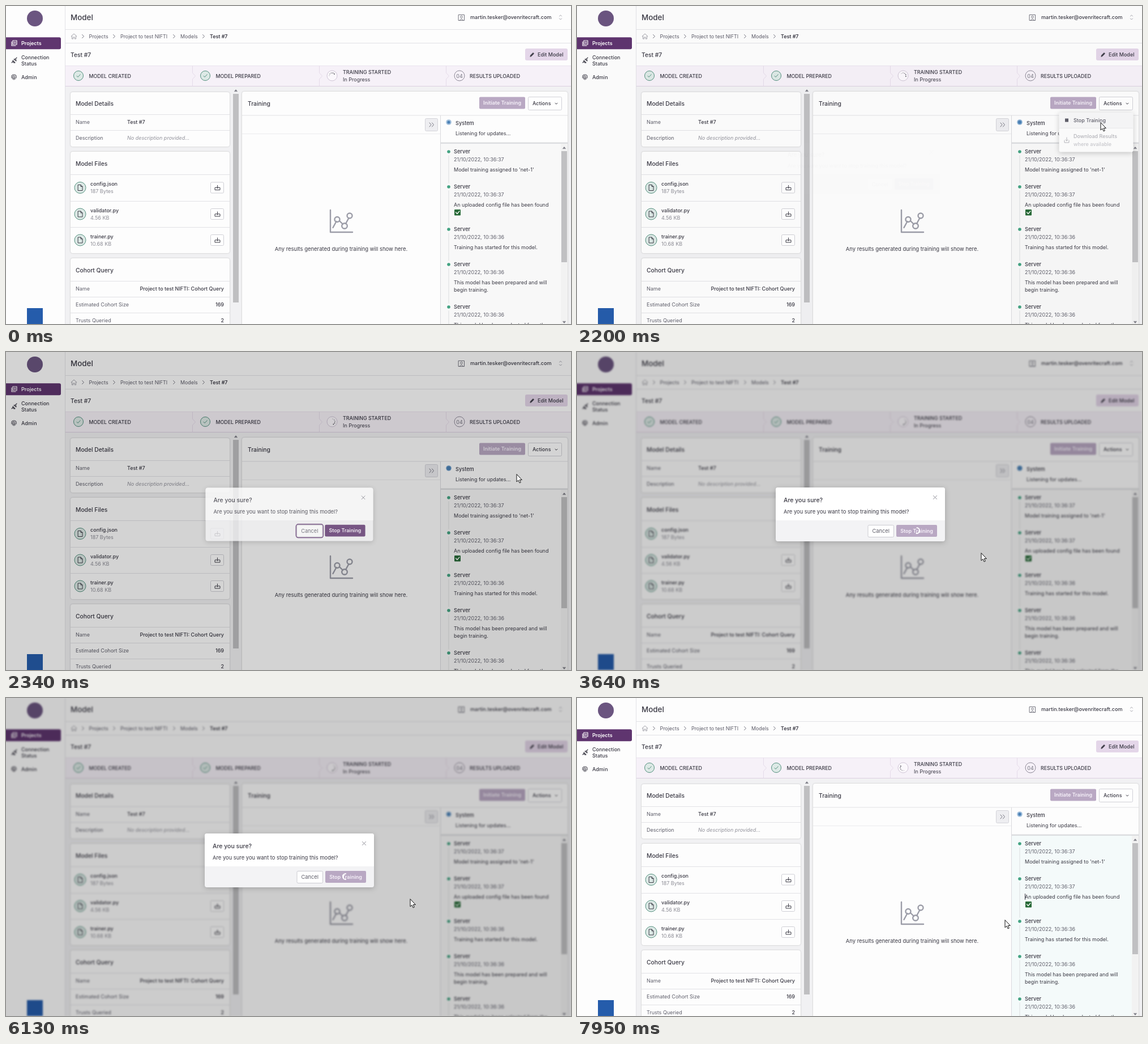
Recreate the animation shown at these times as an HTML page. Size 998x561 px, loop 8 s.

```html
<!DOCTYPE html>
<html lang="en">
<head>
<meta charset="utf-8">
<title>Model training</title>
<style>
  html, body { margin: 0; width: 100%; height: 100%; overflow: hidden; background: #fff; }
  svg { display: block; font-family: Inter, "Open Sans", sans-serif; }
  .card { filter: drop-shadow(0 .6px 1px rgba(0,0,0,.22)); }
  .float { filter: drop-shadow(0 2px 5px rgba(0,0,0,.2)); }
</style>
</head>
<body>
<svg id="stage" width="998" height="561" viewBox="0 0 998 561"></svg>
<script>
const INK = '#3b3a45', GREY = '#72727d', PALE = '#a2a2aa', RULE = '#e2e2e6',
      PURPLE = '#5f356f', FADED = '#b9a8c3', GREEN = '#55917f';

// Drawing helpers; text is placed by its vertical centre.
const text = (x, y, s, { size = 9, w = 400, c = INK, anchor = 'start', style = 'normal' } = {}) =>
  `<text x="${x}" y="${y + size * .36}" font-size="${size}" font-weight="${w}" fill="${c}" text-anchor="${anchor}" font-style="${style}">${s}</text>`;
const rect = (x, y, w, h, fill, r = 0, extra = '') =>
  `<rect x="${x}" y="${y}" width="${w}" height="${h}" rx="${r}" fill="${fill}" ${extra}/>`;
const path = (d, c = INK, w = 1, fill = 'none') =>
  `<path d="${d}" stroke="${c}" stroke-width="${w}" fill="${fill}" stroke-linecap="round" stroke-linejoin="round"/>`;
const circle = (x, y, r, fill, c = 'none', w = 1) =>
  `<circle cx="${x}" cy="${y}" r="${r}" fill="${fill}" stroke="${c}" stroke-width="${w}"/>`;
const hline = (x1, x2, y, c = RULE) => rect(x1, y, x2 - x1, 1, c);
const card = (x, y, w, h) => rect(x, y, w, h, '#fdfdfd', 4, 'class="card"');
const outline = c => `stroke="${c}" stroke-width="1"`;
const title = { size: 10.3, w: 500 }, strong = { w: 500 };

function sidebar() {
  return rect(0, 0, 104, 561, '#fdfdfd') + rect(104, 0, 1, 561, RULE)
    + circle(51, 22, 14, '#6b5580')
    + rect(-4, 55.3, 101, 21, PURPLE, 3)
    + path('M12 61H19V68H12ZM10 63V70H17M14 63.5H17M14 65.5H17', '#fff', 1.2)
    + text(27, 65.5, 'Projects', { w: 600, c: '#fff' })
    + path('M10 100L12 98M17 93L19 91M12 96L16 100Q12 101 12 96M14 94L18 97Q18 92 14 94', INK, 1.1)
    + text(27, 90.5, 'Connection', strong) + text(27, 101.5, 'Status', strong)
    + path('M10 127Q9 121 14 121T18 127M12 129V126Q12 123 14 123T16 129M14 126V130', INK, 1.1)
    + text(27, 125.5, 'Admin', strong)
    + rect(37, 533, 28, 28, '#255cab');
}

function header() {
  const crumb = { size: 8.9, c: '#5c5b68' };
  return rect(105, 0, 893, 105, '#fdfdfd')
    + text(114, 20.5, 'Model', { size: 13.4, w: 500 })
    + path('M799.5 15.5H809.5V25.5H799.5ZM801.5 25Q804.5 20.5 807.5 25', GREY)
    + circle(804.5, 19.3, 1.8, 'none', GREY)
    + text(820, 20, 'martin.tesker@ovenritecraft.com', { size: 9.1, w: 500 })
    + path('M977.5 18L979.5 16L981.5 18M977.5 22L979.5 24L981.5 22', PALE)
    + hline(105, 998, 41) + hline(105, 998, 65)
    + path('M115 53.5L120 49L125 53.5M116.5 53V58H118.7V55H121.3V58H123.5V53', PALE)
    + [136, 191, 297, 349].map(x => path(`M${x - 1.5} 50.5L${x + 1.5} 53.5L${x - 1.5} 56.5`, GREY)).join('')
    + text(146.5, 53.5, 'Projects', crumb) + text(202, 53.5, 'Project to test NIFTI', crumb)
    + text(308, 53.5, 'Models', crumb) + text(360, 53.5, 'Test #7', { size: 8.9, w: 600 })
    + text(114, 86, 'Test #7', title)
    + rect(917, 75, 75, 21, '#e4d6e9', 3)
    + path('M926 89L926.5 87L931 82.5L932.5 84L928 88.5Z', INK, .9, INK)
    + text(939, 85.5, 'Edit Model', strong);
}

function steps() {
  const label = { size: 8.85, w: 500 };
  const done = x => circle(x, 123, 8.5, '#dde9e6', GREEN) + path(`M${x - 3} 123.3L${x - 1} 125.4L${x + 3.2} 120.8`, GREEN);
  return rect(105, 105, 893, 36, '#f6f1f8') + hline(105, 998, 105, '#ebe3ef') + hline(105, 998, 141, '#dcd0e1')
    + [329.5, 553.5, 777.5].map(x => path(`M${x} 106V118L${x + 5} 123.5L${x} 129V141`, '#e5dbe9')).join('')
    + done(128) + text(146.5, 123.5, 'MODEL CREATED', label)
    + done(352) + text(370.5, 123.5, 'MODEL PREPARED', label)
    + circle(576, 123, 9, '#fbf8fc', '#d0c6d6') + '<g id="dots"></g>'
    + text(595, 116.5, 'TRAINING STARTED', label) + text(595, 129.5, 'In Progress')
    + circle(801, 123, 9, 'none', '#8c8896') + text(801, 123.3, '04', { c: GREY, anchor: 'middle' })
    + text(819, 123.5, 'RESULTS UPLOADED', label);
}

function fileRow(y, name, size) {
  return circle(131, y, 10, '#dde9e6', GREEN)
    + path(`M127.5 ${y - 5}H132L135 ${y - 2}V${y + 5}H127.5ZM132 ${y - 5}V${y - 2}H135`, INK)
    + text(149, y - 6.5, name, strong) + text(149, y + 6.5, size, { c: '#8d8d96' })
    + rect(361.5, y - 9.5, 23, 19, '#fff', 2, outline('#cfcfd5'))
    + path(`M371 ${y}H369V${y + 4}H378V${y}H376M373.5 ${y - 4}V${y + 1}M371.5 ${y - 1}L373.5 ${y + 1.2}L375.5 ${y - 1}`, INK);
}

function leftColumn() {
  const row = (y, label, value) => text(123, y, label, { c: '#5f5f6b' }) + text(385, y, value, { w: 500, anchor: 'end' });
  return card(114, 152, 281, 96) + text(123, 172, 'Model Details', title)
    + hline(114, 395, 191) + text(123, 205, 'Name', { c: '#5f5f6b' }) + text(214, 205, 'Test #7', strong)
    + hline(114, 395, 219) + text(123, 233, 'Description', { c: '#5f5f6b' })
    + text(214, 233, 'No description provided...', { c: '#92929b', style: 'italic' })
    + card(114, 257, 281, 179) + text(123, 278, 'Model Files', title)
    + [297, 344, 390].map(y => hline(114, 395, y)).join('')
    + fileRow(320.5, 'config.json', '187 Bytes') + fileRow(367, 'validator.py', '4.56 KB') + fileRow(413, 'trainer.py', '10.68 KB')
    + card(114, 445, 281, 130) + text(123, 466, 'Cohort Query', title)
    + [485, 513, 541].map(y => hline(114, 395, y)).join('')
    + row(499, 'Name', 'Project to test NIFTI: Cohort Query')
    + row(527, 'Estimated Cohort Size', '169') + row(555, 'Trusts Queried', '2')
    + path('M403.5 150.5L406 147.5L408.5 150.5Z', GREY, .5, GREY) + rect(401, 155, 10, 368, '#bfbfc1');
}

function trainingPanel() {
  const entries = [
    [256.5, '10:36:37', ["Model training assigned to 'net-1'"]],
    [318.5, '10:36:37', ['An uploaded config file has been found']],
    [393.5, '10:36:36', ['Training has started for this model.']],
    [455.5, '10:36:36', ['This model has been prepared and will', 'begin training.']],
    [530.5, '10:36:36', ['This model has been selected from the']]
  ];
  const log = entries.map(([y, time, lines], i) => {
    const end = i < 4 ? entries[i + 1][0] - 6 : 561;
    return rect(781.5, y + 7, 1, end - y - 7, '#dcdde0') + circle(782, y + .5, 2.8, '#43a382')
      + text(791, y, 'Server', { size: 9.2, w: 500 })
      + text(791, y + 14, '21/10/2022, ' + time, { c: '#5f5f6b' })
      + lines.map((s, n) => text(791, y + 32 + n * 13, s)).join('');
  }).join('');
  return card(417, 151, 575, 430) + text(427, 172.5, 'Training', title)
    + rect(836, 160.5, 81, 21, FADED, 2) + text(876.5, 171, 'Initiate Training', { w: 600, c: '#f7f2fa', anchor: 'middle' })
    + rect(922.5, 160.5, 59, 23, '#fff', 2, outline('#d0d0d6'))
    + rect(921, 159, 63, 26, 'none', 4, `id="actionsRing" stroke="${PURPLE}" stroke-width="1.5"`)
    + text(930, 171.5, 'Actions', strong) + path('M970 171.2L972 173.2L974 171.2', INK)
    + hline(417, 992, 192.5) + hline(417, 767, 225, '#ececef') + rect(767, 193, 1, 368, '#dadade')
    + rect(740.5, 198.5, 22, 22, '#eeeef1', 2, outline('#d3d3d9'))
    + path('M748 206L751 209.5L748 213M752.5 206L755.5 209.5L752.5 213', GREY)
    + path('M573 360V399H612M577.5 391L583.5 380M589 379L595 385M600 384L605.5 374', '#9c9da8', 2.4)
    + circle(585, 376.5, 4.5, 'none', '#9c9da8', 2.4) + circle(598, 388, 4.8, 'none', '#9c9da8', 2.4) + circle(607, 370, 4.5, 'none', '#9c9da8', 2.4)
    + text(592, 428.5, 'Any results generated during training will show here.', { size: 9.45, anchor: 'middle' })
    + '<g id="pulse"></g>' + text(794, 206.5, 'System', { size: 9.2, w: 500 }) + text(794, 224.5, 'Listening for updates...')
    + rect(768, 243, 212, 318, '#f8f8f8', 0, 'id="logArea"') + rect(768, 240.5, 224, 2.5, '#dcdde0') + log
    + rect(792, 359, 11, 10.5, '#286a38', 1) + path('M794.5 364L797 366.5L801 361.8', '#fff', 1.3)
    + rect(980, 243, 12, 318, '#f2f2f2') + rect(981, 256, 10, 196, '#c0c0c2')
    + path('M983.5 251.5L986 248.5L988.5 251.5Z', GREY, .5, GREY) + path('M983.5 556.5L986 559.5L988.5 556.5Z', GREY, .5, GREY);
}

function menu() {
  return '<g id="menu">' + rect(851.5, 188, 131, 69.5, '#fdfdfd', 3, 'class="float"')
    + rect(852, 188, 130, 27, '#f7f7f8', 2) + hline(852, 982, 215, '#ececee')
    + rect(862, 198.5, 6, 6, '#5f5e6a') + text(877, 201.5, 'Stop Training', { w: 500, c: '#5f5e6a' })
    + path('M861 237V241H869V237M865 232V238M863 236L865 238L867 236', '#b5b5bb')
    + text(877, 229.5, 'Download Results', { w: 500, c: '#b5b5bb' })
    + text(877, 243.5, 'where available', { w: 500, c: '#c9c9ce' }) + '</g>';
}

function dialog() {
  return '<g id="dialog"><g class="float">' + rect(351, 239, 299, 95, '#f3f3f5', 4)
    + path('M351 297V243Q351 239 355 239H646Q650 239 650 243V297Z', 'none', 0, '#fff') + '</g>'
    + text(365, 261.5, 'Are you sure?', { size: 10.5, w: 500 })
    + path('M629.5 253.5L635.5 259.5M635.5 253.5L629.5 259.5', '#8b8b94')
    + text(365, 281.5, 'Are you sure you want to stop training this model?', { size: 9.4 })
    + rect(514, 305.5, 45.5, 21, '#fff', 2, outline('#cbcbd1'))
    + rect(512.5, 304, 48.5, 24, 'none', 4, `id="cancelRing" stroke="${PURPLE}" stroke-width="1.5"`)
    + text(536.7, 316, 'Cancel', { size: 9.3, c: '#5f5e6a', anchor: 'middle' })
    + rect(564, 305, 72, 21, PURPLE, 2, 'id="stopButton"')
    + text(600, 315.3, 'Stop Training', { w: 600, c: '#f7f2fa', anchor: 'middle' })
    + '<g id="busy">' + path('M600 320A5 5 0 0 1 600 310', '#fff', 2) + '</g></g>';
}

const $ = id => document.getElementById(id);
$('stage').innerHTML = '<g id="page">' + rect(0, 0, 998, 561, '#f1f1f3')
  + sidebar() + header() + steps() + leftColumn() + trainingPanel() + menu() + '</g>'
  + rect(0, 0, 998, 561, '#000', 0, 'id="shade"') + dialog()
  + '<g id="caret">' + path('M791.5 345.5V355.5', INK) + '</g>'
  + '<g id="cursor">' + path('M0 0V13L3 10.3L5.2 15L7.3 14L5.2 9.6H9Z', '#111', 1, '#fff') + '</g>';

const LOOP = 8000, FRAMES = 116;
const clamp = v => Math.max(0, Math.min(1, v));
const smooth = v => (v = clamp(v), v * v * (3 - 2 * v));
const show = (id, opacity) => $(id).setAttribute('opacity', opacity);

// Pointer stops: time, x, y
const arrival = [[130, 800, 498], [760, 946, 172], [1000, 946, 178], [1160, 943, 190], [1650, 926, 205], [2276, 925, 206],
  [2345, 902, 216], [2540, 815, 255], [2950, 604, 312], [3300, 606, 314], [3620, 714, 355]];
const departure = [[7520, 775, 362], [7920, 756, 392]];

function along(stops, t) {
  const i = stops.findIndex(s => s[0] > t);
  if (i < 1) return stops.at(i).slice(1);
  const [t0, x0, y0] = stops[i - 1], [t1, x1, y1] = stops[i], p = smooth((t - t0) / (t1 - t0));
  return [x0 + (x1 - x0) * p, y0 + (y1 - y0) * p];
}

function stepDots(t) {
  let dots = '';
  const head = t / 1030 * 2 * Math.PI - Math.PI / 2 + .9;
  for (let i = 0; i < 5; i++) {
    const a = head - i * .6;
    dots += `<circle cx="${576 + 5 * Math.cos(a)}" cy="${123 + 5 * Math.sin(a)}" r=".9" fill="${INK}" opacity="${1 - i * .19}"/>`;
  }
  return dots;
}

function draw(t) {
  const closing = smooth((t - 6310) / 210);
  const open = smooth((t - 2190) / 220) * (1 - closing);
  const shade = smooth((t - 2176) / 220) * (1 - closing);
  const blur = 1.8 * smooth((t - 2230) / 250) * (1 - closing);
  const clicked = t > 3140;

  $('page').style.filter = blur > .02 ? `blur(${blur}px)` : 'none';
  show('shade', .195 * shade);
  show('menu', smooth((t - 880) / 140) * (1 - clamp((t - 2245) / 95)));
  show('actionsRing', t > 790 && t < 2200 ? 1 : 0);
  $('logArea').setAttribute('fill', t > 6450 ? '#f4fafa' : '#f8f8f8');

  const scale = .95 + .05 * open;
  $('dialog').setAttribute('transform', `translate(500.5 286.5) scale(${scale}) translate(-500.5 -286.5)`);
  show('dialog', open);
  show('cancelRing', t > 2300 && !clicked ? 1 : 0);
  $('stopButton').setAttribute('fill', clicked ? FADED : PURPLE);
  show('busy', clicked ? 1 : 0);
  $('busy').setAttribute('transform', `rotate(${t * .36 - 50} 600 315)`);

  $('dots').innerHTML = stepDots(t > 2400 && t < 6400 ? 2400 : t);
  const beat = .5 - .5 * Math.cos(t / 1000 * 2 * Math.PI);
  $('pulse').innerHTML = circle(782, 205, 4.8, `rgba(76,134,190,${.5 + .3 * beat})`) + circle(782, 205, 2.6 + 1.2 * beat, '#4a80b5');

  const [x, y] = along(t < 7000 ? arrival : departure, t);
  $('cursor').setAttribute('transform', `translate(${x} ${y})`);
  show('cursor', t > 130 && t < 6520 || t > 7520 ? 1 : 0);
  show('caret', t > 6690 ? 1 : 0);
}

function tick() {
  const t = performance.now() % LOOP;
  const step = Math.min(FRAMES - 1, Math.floor(t / LOOP * FRAMES + .25));
  draw(step * LOOP / FRAMES);
  requestAnimationFrame(tick);
}
tick();
</script>
</body>
</html>
```
